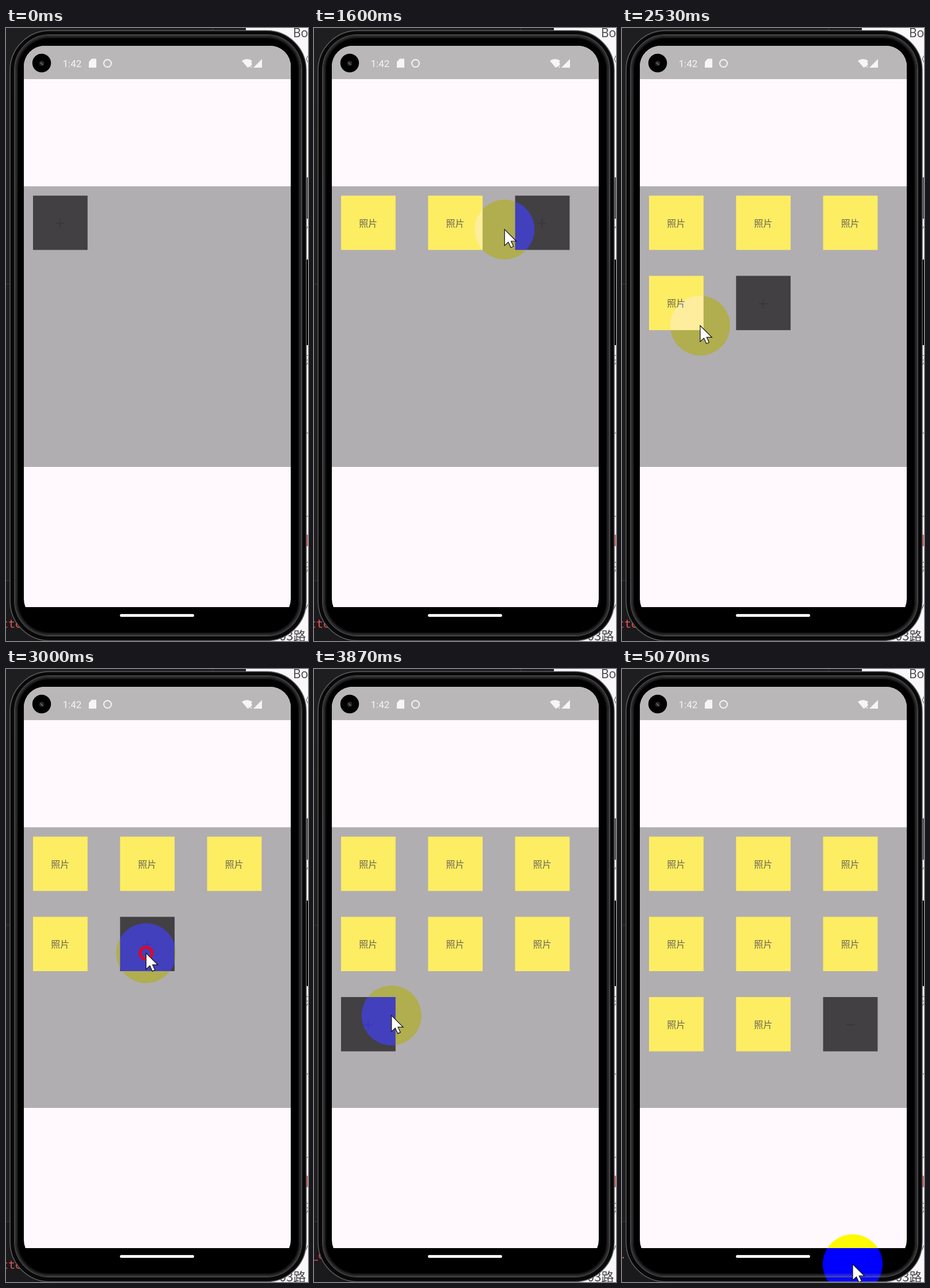
Write an HTML page that moves like this. It is 525 px wide and 1067 px high and loops after 5.14 s.

```html
<!DOCTYPE html>
<html lang="zh">
<head>
<meta charset="utf-8">
<title>Photo grid</title>
<style>
  html, body { margin: 0; width: 100%; height: 100%; overflow: hidden; background: #1e1d20; }
  svg { display: block; width: 525px; height: 1067px; }
  .label { font: 16px "Noto Sans CJK SC", "Noto Sans CJK", sans-serif; fill: #6c6255; text-anchor: middle; }
  .side { font: 22px "Noto Sans CJK SC", "Noto Sans CJK", sans-serif; fill: #444346; }
  .log { font: 20px "Noto Sans Mono", monospace; }
  .clock { font: 17px Roboto, sans-serif; fill: #f7f5f7; }
  #halo { mix-blend-mode: difference; }
</style>
</head>
<body>
<svg viewBox="0 0 525 1067" xmlns="http://www.w3.org/2000/svg">
  <defs>
    <clipPath id="screen"><rect x="31" y="31" width="464" height="999" rx="36"/></clipPath>
  </defs>

  <!-- desktop behind the phone -->
  <rect width="525" height="1067" fill="#1e1d20"/>
  <path d="M359.5 0V6M0 446H8M0 962H8" stroke="#39383b"/>
  <rect y="963" width="90" height="104" fill="#1a191c"/>
  <rect x="417" width="108" height="1067" fill="#f9f7fa"/>
  <text class="side" x="499" y="16" style="font-family:'Open Sans',sans-serif;font-size:21px">Bo</text>
  <text class="side" x="475" y="1066">03路</text>
  <path d="M525 48l-3 6 3 6M525 345l-3 5M522 570h3M522 578h3M525 582l-3 5M522 705h3M522 850h3M522 930h3M522 938h3M525 942l-3 6M525 1003l-4 9" stroke="#555" fill="none"/>
  <path d="M523.5 882v20" stroke="#b8434b" stroke-width="2"/>
  <text id="log" class="log"></text>

  <!-- phone -->
  <rect x="519" y="260" width="6" height="72" fill="#58575a"/>
  <rect x="519" y="403" width="6" height="149" fill="#050505"/>
  <g fill="none">
    <rect x="7" y="4.5" width="515" height="1062" rx="69" fill="#080808" stroke="#5f5e61" stroke-width="1.5"/>
    <rect x="15" y="12" width="499" height="1046" rx="61" stroke="#454447" stroke-width="2"/>
    <rect x="17.5" y="14.5" width="494" height="1041" rx="58" stroke="#29282a" stroke-width="3"/>
    <rect x="20" y="17" width="489" height="1036" rx="56" fill="#000" stroke="#131313" stroke-width="2"/>
  </g>
  <g clip-path="url(#screen)">
    <rect x="31" y="31" width="464" height="977" fill="#fff9fe"/>
    <rect x="31" y="31" width="464" height="58" fill="#bab7b9"/>
    <rect x="31" y="275.5" width="464" height="488.5" fill="#b0aeb1"/>
  </g>
  <rect x="198" y="1020" width="129" height="5" rx="2.5" fill="#f4f2f4"/>

  <!-- status bar -->
  <circle cx="62" cy="61" r="16.2"/>
  <circle cx="62" cy="61.5" r="4.5" fill="#252628"/>
  <path d="M60 60l4 4" stroke="#77797c" stroke-width="1.5"/>
  <text class="clock" x="98.5" y="68">1:42</text>
  <g fill="#f7f5f7">
    <path d="M149 53.5h8v15.5h-13V59z"/>
    <path d="M410 57q9-6 18 0l-2 3v6l-6 3zM430 69L445 54V69z"/>
    <path d="M426.5 60v5m0 2v2" stroke="#f7f5f7" stroke-width="1.5"/>
  </g>
  <circle cx="176.5" cy="61.5" r="6.5" fill="none" stroke="#f7f5f7" stroke-width="2"/>

  <g id="tiles"></g>

  <g id="pointer">
    <circle id="halo" r="52" fill="#00f"/>
    <circle id="ring" r="10.3" fill="none" stroke="#f00014" stroke-width="4.6"/>
    <path id="arrow" d="M0 0V28L6.5 22 11 31.5 15.5 29.3 11.3 20.3H20.3Z" fill="#fff" stroke="#111" stroke-width="1.2"/>
  </g>
</svg>

<script>
const LOOP = 5140, STEP = 1000 / 15, STEPS = 77;
const $ = id => document.getElementById(id);

// pointer keys: time, x, y
const path = [
  [260, 590, 215], [400, 468, 265], [620, 150, 345], [740, 97, 348], [1000, 97, 350],
  [1130, 117, 355], [1300, 236, 350], [1440, 243, 350], [1720, 386, 352], [1860, 388, 358],
  [2000, 385, 428], [2130, 269, 468], [2330, 63, 484], [2440, 68, 490], [2530, 134, 518],
  [2730, 224, 503], [2860, 238, 496], [3040, 246, 494], [3330, 364, 470], [3470, 371, 468],
  [3600, 371, 470], [3730, 330, 515], [3900, 115, 612], [4070, 112, 618], [4270, 222, 618],
  [4330, 230, 618], [4500, 228, 619], [4800, 196, 621], [4870, 238, 690], [4935, 318, 790],
  [5000, 378, 925], [5067, 401, 1036]
];
const presses = [800, 1330, 1740, 2330, 2920, 3400, 3930, 4320];
const added = [940, 1460, 1870, 2460, 3060, 3600, 4070, 4460];
// log fragment keys: time, text, x, baseline, colour
const logs = [
  [0, "tto", -8, 1044, "#e5534f"],
  [3060, "_e", -5, 1027, "#c9444e"],
  [4070, "tter", -9, 1061, "#e5534f"],
  [4460, "..", -4, 1026, "#d36a3b"]
];

const cells = Array.from({ length: 9 }, (_, i) => {
  const x = 47 + (i % 3) * 151.3, y = 291.8 + Math.floor(i / 3) * 139.6;
  $("tiles").insertAdjacentHTML("beforeend",
    `<g><rect x="${x}" y="${y}" width="94.8" height="94.5"/>` +
    `<text class="label" x="${x + 47.2}" y="${y + 54}">照片</text>` +
    `<path d="M${x + 39} ${y + 48.5}h16${i < 8 ? "m-8-8v16" : ""}" stroke="#39373b" stroke-width="2"/></g>`);
  return $("tiles").lastElementChild;
});

const show = (el, on) => el.setAttribute("visibility", on ? "visible" : "hidden");

// cubic Hermite through neighbouring keys, with flat tangents at turning points
function slope(i, k) {
  const a = path[i - 1], b = path[i], c = path[i + 1];
  if (!a || !c) return 0;
  const l = (b[k] - a[k]) / (b[0] - a[0]), r = (c[k] - b[k]) / (c[0] - b[0]);
  return l * r <= 0 ? 0 : 2 * l * r / (l + r);
}

function locate(t) {
  let i = 0;
  while (i < path.length - 2 && path[i + 1][0] <= t) i++;
  const a = path[i], b = path[i + 1], h = b[0] - a[0];
  const u = Math.min(1, Math.max(0, (t - a[0]) / h)), v = 1 - u;
  return [1, 2].map(k =>
    a[k] * v * v * (1 + 2 * u) + b[k] * u * u * (3 - 2 * u) +
    h * u * v * (v * slope(i, k) - u * slope(i + 1, k)));
}

function draw(t) {
  const n = added.filter(s => s <= t).length;
  cells.forEach((cell, i) => {
    const [box, label, plus] = cell.children;
    show(box, i <= n);
    box.setAttribute("fill", i < n ? "#fded62" : "#424043");
    show(label, i < n);
    show(plus, i === n);
  });

  const [, text, lx, ly, colour] = logs.filter(l => l[0] <= t).pop(), log = $("log");
  log.textContent = text;
  log.setAttribute("x", lx);
  log.setAttribute("y", ly);
  log.setAttribute("fill", colour);

  const [x, y] = locate(t), inside = t >= path[0][0];
  for (const id of ["halo", "ring", "arrow"]) {
    $(id).setAttribute("transform", `translate(${x.toFixed(1)} ${y.toFixed(1)})`);
    show($(id), inside);
  }
  show($("ring"), presses.some((p, i) => t >= p && t < added[i]));
}

let last = -1;
function tick() {
  const t = performance.now() % LOOP;
  const step = Math.min(STEPS - 1, Math.floor((t + 4) / STEP));
  if (step !== last) draw((last = step) * STEP);
  requestAnimationFrame(tick);
}
tick();
</script>
</body>
</html>
```
